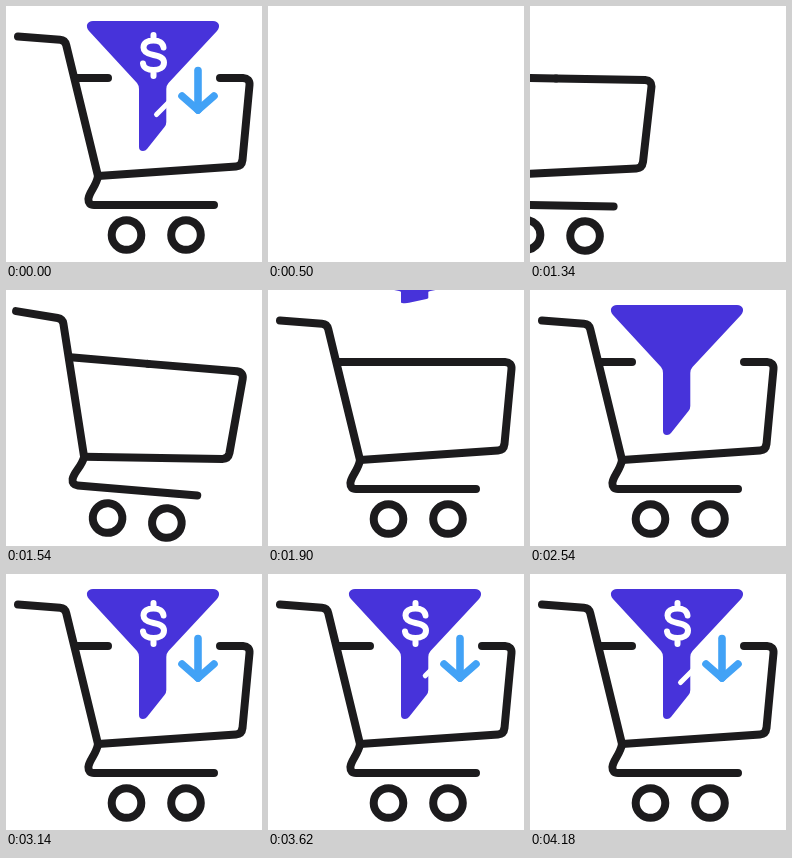
Write an HTML page that moves like this. It is 256 px wide and 256 px high and loops after 5.4 s.

```html
<!DOCTYPE html>
<html lang="en">
<head>
<meta charset="utf-8">
<title>Sales funnel cart</title>
<style>
  html, body { margin: 0; width: 100%; height: 100%; overflow: hidden; background: #fff; }
  svg { display: block; width: 100vw; height: 100vh; }
  path, circle { stroke-linecap: round; stroke-linejoin: round; }
  #cart { fill: none; stroke: #1c1b1d; stroke-width: 8; }
  #dollar { fill: none; stroke: #fff; stroke-width: 6; }
  #cut { fill: none; stroke: #fff; stroke-width: 5; }
  #arrow { fill: none; stroke: #42a2f6; stroke-width: 7.6; }
</style>
</head>
<body>
<svg viewBox="0 0 256 256">
  <g id="cart">
    <path d="M12 30.5 L54 33.8 Q59 34.2 60.2 39 L92 170"/>
    <path id="rimLeft"/>
    <path id="rimRight"/>
    <path d="M92 170 C90.5 180 83 186 82.4 193 Q82.2 199 88 199 H208"/>
    <circle cx="120.5" cy="229" r="14.8"/>
    <circle cx="180" cy="229" r="14.8"/>
  </g>
  <path id="funnel" fill="#4733da" d="M87 15 H207 C213 15 215 20.500 211 25 L162.500 77 Q160.300 79.500 160.300 83 V116 Q160.300 119 158.500 121 L141 143 Q139.500 145 137 145 Q133 145 133 141 V83 Q133 79.500 131 77 L83 25 C79 20.500 81 15 87 15 Z"/>
  <path id="cut" d="M163 96 L150.500 108.500" pathLength="1"/>
  <path id="dollar" d="M157.500 41.500 C157 37 153 34.500 147.500 34.500 C141.500 34.500 137.500 37 137.500 41.500 C137.500 46.500 142 48 147.500 49 C153.500 50 158 52 158 56.500 C158 61.500 153.500 64 147.500 64 C142 64 137.500 62 137 57.500 M147.500 29 V34 M147.500 64 V70"/>
  <g id="arrow">
    <path id="shaft" d="M192 64.500 V103" pathLength="1"/>
    <path id="headLeft" d="M192 104 L176 90" pathLength="1"/>
    <path id="headRight" d="M192 104 L208 90" pathLength="1"/>
  </g>
</svg>
<script>
const LOOP = 5400, STEP = 40, PHASE = 20;
const el = id => document.getElementById(id);

// Each track is a list of [time, value] pairs.
const tracks = {
  slide:    [[1080, -262], [1340, -123], [1540, -10.5], [1600, 0]],
  tilt:     [[1220, 0], [1340, 1.1], [1540, 4.8], [1600, 6], [1660, 5.2], [1760, 1.5], [1840, 0]],
  funnelY:  [[1836, -14], [1900, 1.5], [2220, 75], [2340, 80]],
  stretch:  [[1836, 0], [1900, 0.18], [2220, 1.08], [2340, 1]],
  gap:      [[2020, 0], [2260, 1]],
  dollar:   [[2740, 0], [2900, 1.1], [2980, 1]],
  shaft:    [[2780, 0], [2980, 1]],
  head:     [[2960, 0], [3100, 1]],
  cut:      [[3380, 0], [3900, 1]]
};

function at(name, t) {
  const keys = tracks[name];
  if (t <= keys[0][0]) return keys[0][1];
  for (let i = 1; i < keys.length; i++) {
    const [t0, a] = keys[i - 1], [t1, b] = keys[i];
    if (t < t1) return a + (b - a) * (t - t0) / (t1 - t0);
  }
  return keys[keys.length - 1][1];
}

function show(id, on) {
  el(id).style.visibility = on ? "visible" : "hidden";
}

function trim(id, part) {
  show(id, part > 0);
  el(id).setAttribute("stroke-dasharray", part < 1 ? `${part} 2` : "none");
}

function scaleAround(id, x, y, newY, sx, sy) {
  show(id, sy > 0);
  el(id).setAttribute("transform", `translate(${x} ${newY}) scale(${sx} ${sy}) translate(${-x} ${-y})`);
}

function draw(time) {
  // The finished icon holds across the loop point.
  const t = time < 500 ? LOOP : time;

  show("cart", t >= 1100);
  el("cart").setAttribute("transform", `translate(${at("slide", t)} 0) rotate(${at("tilt", t)} 128 128)`);
  const gap = at("gap", t);
  el("rimLeft").setAttribute("d", `M70 72 H${148 - 46 * gap}`);
  el("rimRight").setAttribute("d",
    `M${148 + 66 * gap} 72 H237 Q244 72.500 243.500 79 L236.500 154 Q235.800 160 230 160.500 L92 170`);

  const stretch = at("stretch", t);
  scaleAround("funnel", 147, 80, at("funnelY", t), Math.max(1, 1 + (stretch - 1) / 4), stretch);

  const size = at("dollar", t);
  scaleAround("dollar", 147.5, 49.5, 49.5, size, size);
  trim("shaft", at("shaft", t));
  trim("headLeft", at("head", t));
  trim("headRight", at("head", t));
  trim("cut", at("cut", t));
}

function frame() {
  const t = performance.now() % LOOP;
  draw(Math.max(0, Math.floor((t - PHASE) / STEP) * STEP + PHASE));
  requestAnimationFrame(frame);
}
frame();
</script>
</body>
</html>
```
